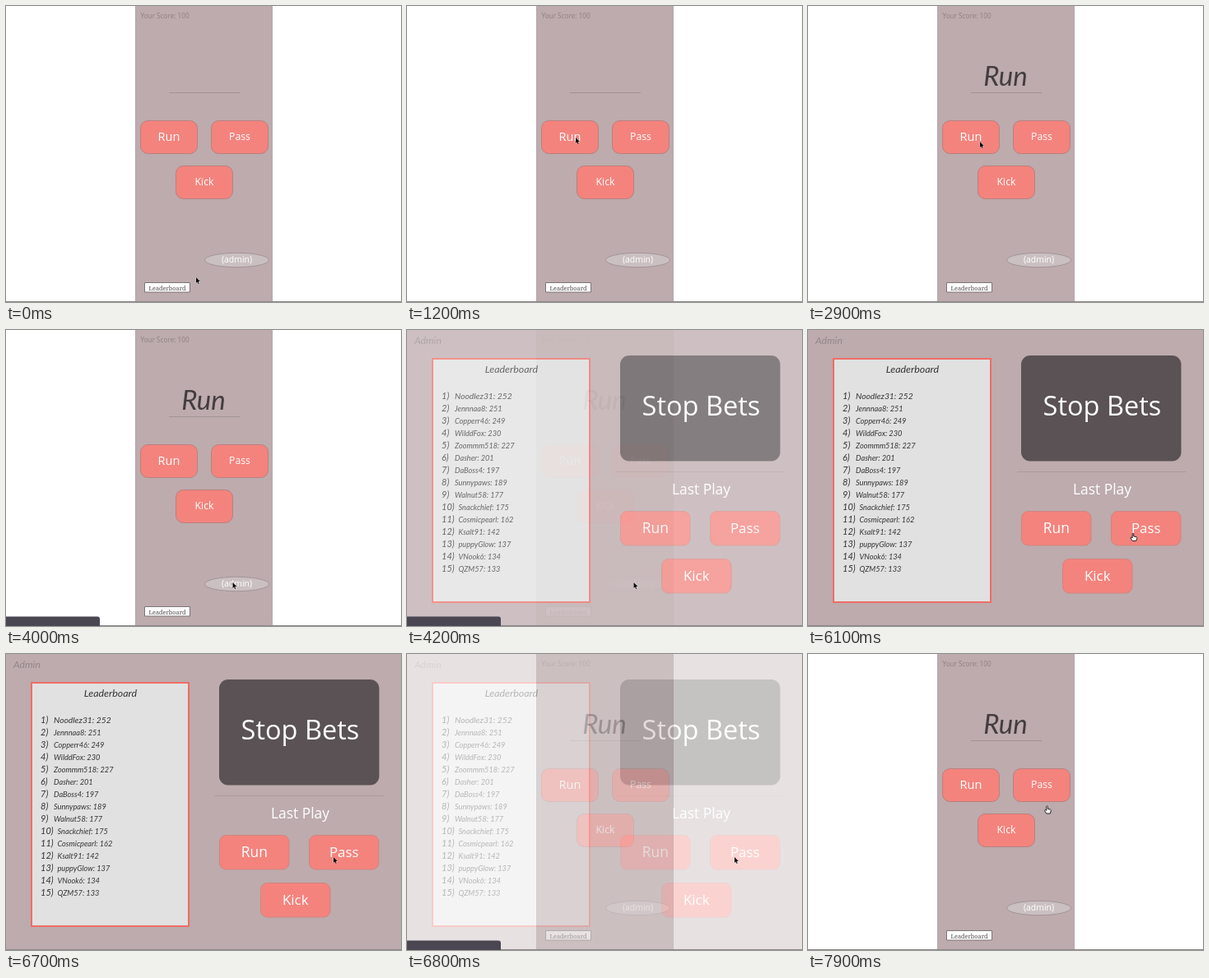
An HTML page with a canvas that plays this animation: 480x360 px, repeating every 8000 ms.

```html
<!DOCTYPE html>
<html lang="en">
<head>
<meta charset="utf-8">
<title>Play betting prototype</title>
<style>
html, body { margin: 0; width: 100%; height: 100%; overflow: hidden; background: #fff; }
canvas { display: block; width: 480px; height: 360px; }
</style>
</head>
<body>
<canvas id="stage" width="480" height="360"></canvas>
<script>
const W = 480, H = 360, LOOP = 8000, STEP = 100, FADE = 400;
const SANS = '"Open Sans", "Noto Sans", sans-serif';
const HAND = 'Lato, "Open Sans", sans-serif';
const SERIF = '"Noto Serif", serif';
const BG = '#bdabad', CORAL = '#f4837d', INK = '#333';

const stage = document.getElementById('stage').getContext('2d');
const layer = document.createElement('canvas');
layer.width = W;
layer.height = H;
const layerCtx = layer.getContext('2d');

const players = `Noodlez31: 252, Jennnaa8: 251, Copperr46: 249, WilddFox: 230,
  Zoommm518: 227, Dasher: 201, DaBoss4: 197, Sunnypaws: 189, Walnut58: 177,
  Snackchief: 175, Cosmicpearl: 162, Ksalt91: 142, puppyGlow: 137, VNook6: 134,
  QZM57: 133`.split(/,\s+/);

// Cursor moves; bow pushes the middle of the way sideways
const moves = [
  { from: 0, to: 800, x: 205, y: 160 },
  { from: 2800, to: 3700, x: 275.5, y: 307, bow: 14 },
  { from: 5100, to: 5900, x: 395, y: 247 },
  { from: 6100, to: 6500, x: 398, y: 247 },
  { from: 7500, to: 7900, x: 290.5, y: 184.5 }
];

const clamp = v => Math.max(0, Math.min(1, v));
const easeOut = p => 1 - (1 - clamp(p)) ** 3;
const smooth = p => p * p * (3 - 2 * p);
const within = (t, a, b) => t >= a && t < b;

function text(c, str, x, y, size, color, family = SANS, style = '', align = 'left') {
  c.font = `${style} ${size}px ${family}`;
  c.textAlign = align;
  c.fillStyle = color;
  c.fillText(str, x, y);
}

function line(c, x1, x2, y, color) {
  c.fillStyle = color;
  c.fillRect(x1, y, x2 - x1, 1);
}

function box(c, x, y, w, h, r, fill, stroke, width = 1) {
  c.beginPath();
  c.roundRect(x, y, w, h, r);
  c.fillStyle = fill;
  c.fill();
  if (!stroke) return;
  c.strokeStyle = stroke;
  c.lineWidth = width;
  c.stroke();
}

// Three play buttons, each the same size
function buttons(c, spots, w, h, r, size, edge) {
  ['Run', 'Pass', 'Kick'].forEach((label, i) => {
    const [x, y] = spots[i];
    box(c, x + 0.5, y + 0.5, w, h, r, CORAL, edge);
    const px = label === 'Run' ? size.run : size.other;
    text(c, label, x + w / 2 + 0.5, y + h / 2 + px * 0.36, px, '#fff', SANS, '', 'center');
  });
}

function drawPhone(c, playAlpha) {
  c.fillStyle = '#fff';
  c.fillRect(0, 0, W, H);
  c.fillStyle = BG;
  c.fillRect(157.5, 0, 166, H);
  c.fillStyle = '#b2a6b1';
  c.fillRect(157, 0, 1, H);
  c.fillRect(323, 0, 1, H);

  text(c, 'Your Score: 100', 163.5, 14.7, 8.2, '#8f8083');
  line(c, 198, 284, 105, '#a19295');
  c.save();
  c.globalAlpha *= playAlpha;
  text(c, 'Run', 240, 97, 33, '#433d3f', HAND, 'italic', 'center');
  c.restore();
  buttons(c, [[163, 139], [249, 139], [206, 194]], 69, 40, 9,
    { run: 14.5, other: 12.3 }, '#b98080');

  c.beginPath();
  c.ellipse(280.5, 309, 39, 8.7, 0, 0, Math.PI * 2);
  c.fillStyle = '#cbc0c1';
  c.fill();
  c.strokeStyle = '#a39598';
  c.lineWidth = 1;
  c.stroke();
  text(c, '(admin)', 280.5, 312, 10.4, '#fff', SANS, '', 'center');

  box(c, 168.5, 336.5, 55, 11.5, 0, '#fff', '#7d7477');
  text(c, 'Leaderboard', 196, 345.5, 7.3, '#4e494a', SERIF, '', 'center');
}

function drawAdmin(c) {
  c.fillStyle = BG;
  c.fillRect(0, 0, W, H);
  text(c, 'Admin', 9, 17, 12.2, '#94868a', HAND, 'italic');

  box(c, 31, 35, 191, 296, 0, '#e1e1e1', '#f06d65', 2);
  text(c, 'Leaderboard', 127, 51.5, 12.4, INK, HAND, 'italic', 'center');
  players.forEach((entry, i) => {
    const y = 83.7 + i * 15.03;
    text(c, `${i + 1})`, 42, y, 11, INK, HAND, 'italic');
    text(c, entry, i < 9 ? 58 : 62.5, y, i ? 9.2 : 10.3, INK, HAND, 'italic');
  });

  box(c, 259, 31, 194.5, 128.5, 11, '#5a5254');
  text(c, 'Stop Bets', 357.4, 103.5, 32.5, '#fff', SANS, '', 'center');
  line(c, 254, 459, 172, '#a99a9c');
  text(c, 'Last Play', 357.5, 199.5, 17.4, '#fff', SANS, '', 'center');
  buttons(c, [[259, 220], [368, 220], [309, 278]], 84.5, 41.5, 8,
    { run: 17.4, other: 16.9 }, '#d08482');
}

function cursorAt(t) {
  let x = 231, y = 330;
  for (const m of moves) {
    if (t < m.from) break;
    const p = smooth(clamp((t - m.from) / (m.to - m.from)));
    const bend = (m.bow || 0) * Math.sin(Math.PI * p);
    x += (m.x - x) * p + bend;
    y += (m.y - y) * p;
  }
  return [x, y];
}

const arrow = new Path2D('M0 0V7L1.6 5.6 2.6 8 3.7 7.5 2.7 5.1H4.9Z');
const pointer = new Path2D(
  'M-.8 .8Q0-.4 .8 .8V4L4 4.6Q5 5 4.8 6.5L3.8 9.5H-.8L-3 6Q-3 4.8-1.8 5.2L-.8 6Z');

function drawCursor(c, t) {
  const [x, y] = cursorAt(t);
  const hand = within(t, 6000, 6500) || t >= 7800;
  const ring = within(t, 1000, 1200) ? 12 : within(t, 1600, 1800) ? 16 : 0;
  c.save();
  c.translate(x, y);
  c.lineWidth = 1;
  if (ring) {
    c.beginPath();
    c.arc(0, 0, ring, 0, Math.PI * 2);
    c.strokeStyle = 'rgba(40, 34, 36, .6)';
    c.stroke();
  }
  c.lineJoin = 'round';
  if (hand) {
    c.fillStyle = '#fff';
    c.strokeStyle = '#222';
    c.fill(pointer);
    c.stroke(pointer);
  } else {
    c.fillStyle = '#0a0a0a';
    c.strokeStyle = 'rgba(255, 255, 255, .6)';
    c.stroke(arrow);
    c.fill(arrow);
  }
  c.restore();
}

function blend(page, alpha) {
  if (alpha <= 0) return;
  page(layerCtx);
  stage.globalAlpha = alpha;
  stage.drawImage(layer, 0, 0);
  stage.globalAlpha = 1;
}

function draw(t) {
  const back = t >= 6000;
  const phone = c => drawPhone(c, t < 2000 ? 0 : t < 2100 ? 0.6 : 1);
  const [from, to] = back ? [drawAdmin, phone] : [phone, drawAdmin];
  const p = easeOut((t - (back ? 6736 : 4055)) / FADE);

  // Old page fades out over white while the new one fades in
  stage.fillStyle = '#fff';
  stage.fillRect(0, 0, W, H);
  blend(from, 1 - p);
  blend(to, p);

  line(stage, 0, W, 359, '#8d8789');
  if (within(t, 3900, 4700) || within(t, 6750, 7400)) {
    box(stage, -1, 348.5, 115, 14, [0, 3, 0, 0], '#4a4752');
  }
  drawCursor(stage, t);
}

const start = performance.now();
function tick(now) {
  const t = Math.max(0, now - start) % LOOP;
  draw(Math.floor(t / STEP) * STEP);
  requestAnimationFrame(tick);
}
draw(0);
requestAnimationFrame(tick);
</script>
</body>
</html>
```
